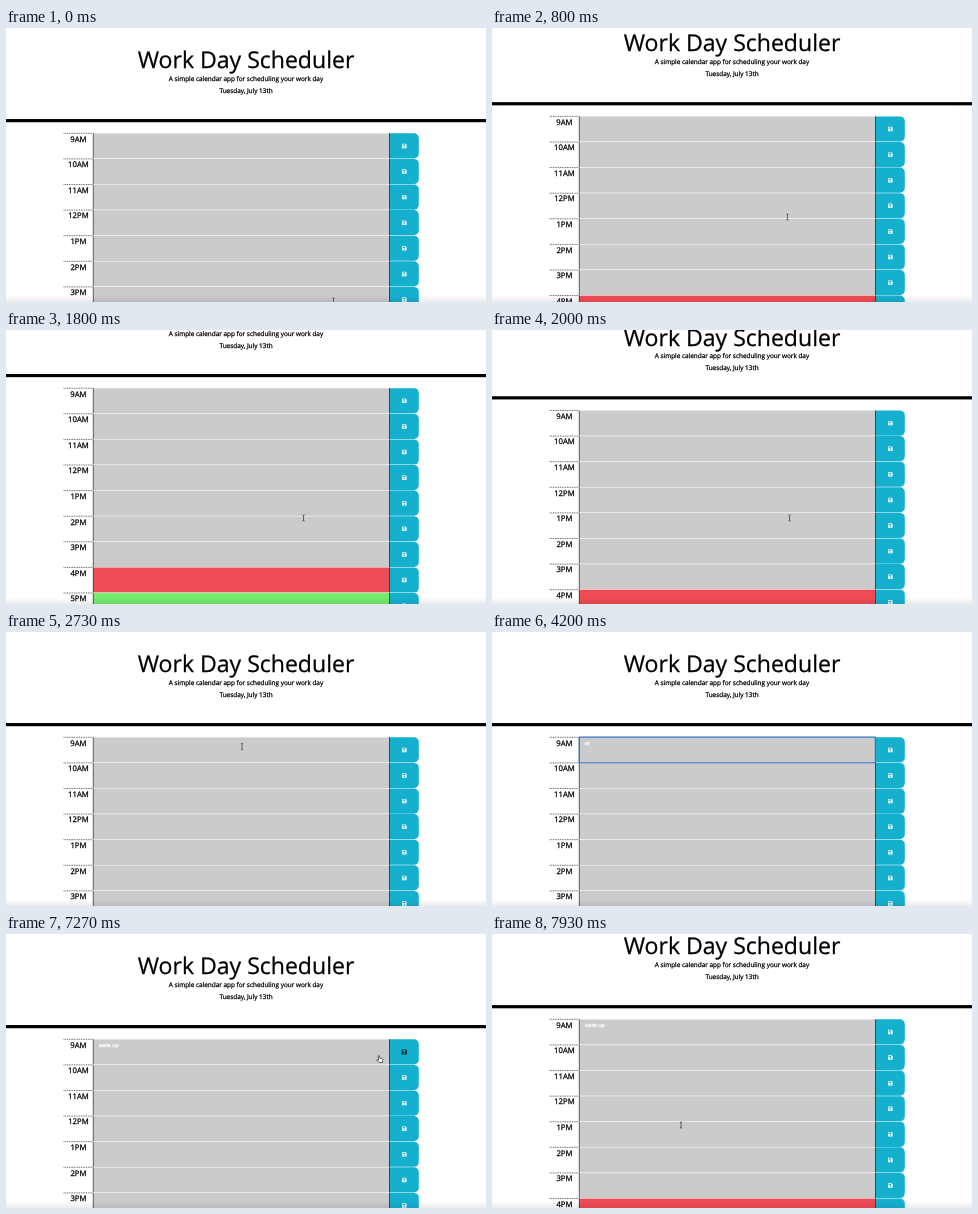
An HTML page with a canvas for the animation above (8000 ms loop, 480 by 274 pixels).

```html
<!DOCTYPE html>
<html lang="en">
<head>
<meta charset="utf-8">
<title>Work Day Scheduler</title>
<style>
html, body { margin: 0; width: 100%; height: 100%; overflow: hidden; background: #fff; }
canvas { display: block; }
</style>
</head>
<body>
<canvas id="stage" width="480" height="274"></canvas>
<script>
const ctx = document.getElementById('stage').getContext('2d');
const LOOP = 8000, ZOOM = 0.32; // the page is laid out 1500 px wide
const GREY = '#cbcbcb', RED = '#f04c55', GREEN = '#72ec6c', CYAN = '#16b0cf';
const TOP = 328, ROW = 80, LEFT = 180, FIELD = 272.5, BUTTON = 1197.5, RIGHT = 1290;
const NOTE = 'wake up', TYPE_START = 4200, KEY_GAP = 210;

// Pointer glides in stage pixels
const HOME = { x: 327.5, y: 273 };
const MOVES = [
  { from: 240, to: 530, x: 295.5, y: 189 },
  { from: 1400, to: 1470, x: 297.5, y: 188 },
  { from: 2560, to: 2730, x: 236, y: 114.5 },
  { from: 6100, to: 6500, x: 423, y: 135 },
  { from: 6500, to: 6730, x: 400, y: 116 },
  { from: 7200, to: 7770, x: 189, y: 191 },
];

const ramp = (t, from, to) => Math.min(1, Math.max(0, (t - from) / (to - from)));
const easeOut = u => 1 - (1 - u) ** 2;

function scrollAt(t) {
  const down = ramp(t, 645, 1215), back = easeOut(ramp(t, 1695, 2530));
  return 193 * (down - back) + 0.31 * Math.max(0, t - 7730);
}

function pointerAt(t) {
  return MOVES.reduce((p, m) => {
    const u = ramp(t, m.from, m.to);
    return { x: p.x + (m.x - p.x) * u, y: p.y + (m.y - p.y) * u };
  }, HOME);
}

function text(str, x, y, size, color = '#000', align = 'center') {
  ctx.font = `${size}px "Open Sans", sans-serif`;
  ctx.textAlign = align;
  ctx.fillStyle = ctx.strokeStyle = color;
  ctx.lineWidth = 0.8; // slightly heavier letters
  ctx.fillText(str, x, y);
  ctx.strokeText(str, x, y);
}

function rect(x, y, w, h, color) {
  ctx.fillStyle = color;
  ctx.fillRect(x, y, w, h);
}

function saveIcon(x, y, hover) {
  const s = hover ? 1.2 : 1;
  ctx.save();
  ctx.translate(x, y);
  ctx.scale(s, s);
  ctx.fillStyle = hover ? '#102c34' : '#fff';
  ctx.fill(new Path2D('M-7-7H4L7-4V7H-7z'));
  rect(-5, -5, 8, 4, CYAN);
  ctx.beginPath();
  ctx.arc(0, 3, 2.2, 0, 7);
  ctx.fill();
  ctx.restore();
}

function drawRow(i, t) {
  const y = TOP + i * ROW, hour = 9 + i;
  text(hour < 12 ? `${hour}AM` : `${(hour - 1) % 12 + 1}PM`, (LEFT + FIELD) / 2, y + 27, 24);
  ctx.strokeStyle = '#000';
  ctx.lineWidth = 2;
  ctx.setLineDash([3, 2.4]);
  ctx.beginPath();
  ctx.moveTo(LEFT, y + 1);
  ctx.lineTo(FIELD, y + 1);
  ctx.stroke();
  ctx.setLineDash([]);

  rect(FIELD, y, BUTTON - FIELD, ROW, i < 7 ? GREY : i === 7 ? RED : GREEN);
  rect(FIELD, y, BUTTON - FIELD, 1.4, '#fff');
  ctx.fillStyle = CYAN;
  ctx.beginPath();
  ctx.roundRect(BUTTON, y + 1, RIGHT - BUTTON, ROW - 1.4, [0, 15, 15, 0]);
  ctx.fill();
  rect(FIELD - 1, y + 1, 1.8, ROW - 1, '#000');
  rect(BUTTON, y + 1, 1.8, ROW - 1, '#000');
  saveIcon((BUTTON + RIGHT) / 2 + 1, y + 40.5, i === 0 && t >= 6700 && t < 7320);
}

function drawNote(t) {
  const typed = NOTE.slice(0, Math.max(0, Math.floor((t - TYPE_START) / KEY_GAP) + 1));
  text(typed, FIELD + 17, TOP + 25, 16, '#fff', 'left');
  if (t < 2870 || t >= 6870) return;
  const caretX = FIELD + 18 + ctx.measureText(typed).width;
  const blinkedOff = t >= 5930 && t < 6430;
  if (typed && !blinkedOff) rect(caretX, TOP + 11, 1.6, 18, '#fff');
  ctx.strokeStyle = '#2f74c8';
  ctx.lineWidth = 3.6;
  ctx.strokeRect(FIELD, TOP + 0.5, BUTTON - FIELD + 0.5, ROW);
}

function shape(d, fill, stroke, width) {
  const path = new Path2D(d);
  ctx.fillStyle = fill;
  ctx.fill(path);
  ctx.strokeStyle = stroke;
  ctx.lineWidth = width;
  ctx.stroke(path);
}

function drawPointer(t) {
  if (t >= TYPE_START && t < 6100) return; // hidden while typing
  const { x, y } = pointerAt(t);
  ctx.save();
  ctx.translate(x, y);
  if (t >= 6620 && t < 7310) {
    shape('M-1.6-3.5q.7-.6 1.2 0l.6 2.4 2 .3q1.2.3 1 1.4l-.4 2.5H-.7L-2.8.9q-.2-.9.7-.7l1 .6z', '#fff', '#222', 0.7);
  } else if (x > 413) {
    shape('M-1.5-3v6l1.4-1.2 1 2 .9-.4-.9-1.9h1.8z', '#000', '#fff', 0.2);
  } else {
    shape('M-1.1-3.1Q0-3.1 0-2.3V2.3Q0 3.1-1.1 3.1M1.1-3.1Q0-3.1 0-2.3M0 2.3Q0 3.1 1.1 3.1', 'transparent', '#333', 0.7);
  }
  ctx.restore();
}

function draw(t) {
  rect(0, 0, 480, 274, '#fff');
  ctx.save();
  ctx.scale(ZOOM, ZOOM);
  ctx.translate(0, -scrollAt(t));
  text('Work Day Scheduler', 750, 126, 72);
  text('A simple calendar app for scheduling your work day', 750, 166.5, 20);
  text('Tuesday, July 13th', 750, 202, 20);
  rect(0, 284.5, 1500, 10, '#000');
  for (let i = 0; i < 9; i++) drawRow(i, t);
  drawNote(t);
  ctx.restore();

  const shade = ctx.createLinearGradient(0, 267, 0, 274);
  shade.addColorStop(0, 'rgba(0,0,0,0)');
  shade.addColorStop(1, 'rgba(0,0,0,.08)');
  rect(0, 267, 480, 7, shade);
  drawPointer(t);
}

ctx.textRendering = 'geometricPrecision';
ctx.lineJoin = 'round';
const start = performance.now();
function tick() {
  draw((performance.now() - start) % LOOP);
  requestAnimationFrame(tick);
}
tick();
</script>
</body>
</html>
```
